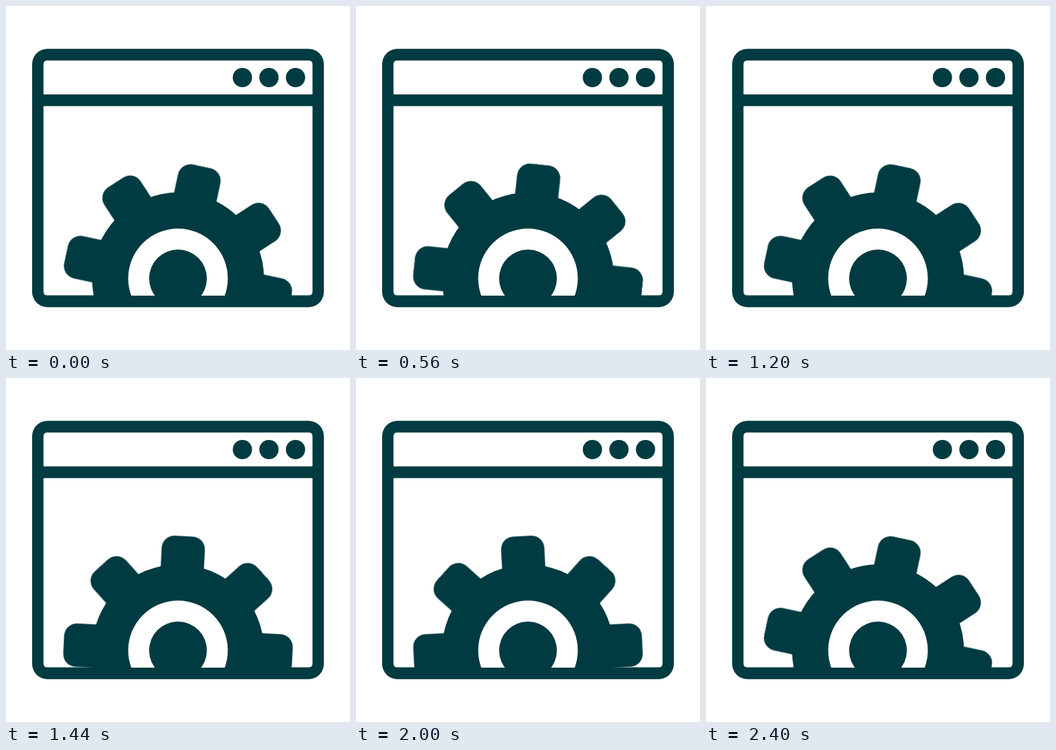
An HTML page for the animation above (2.48 s loop, 500 px wide and 500 px high).

```html
<!DOCTYPE html>
<html lang="en">
<head>
<meta charset="utf-8">
<title>Browser window with turning gear</title>
<style>
  html, body { margin: 0; width: 100%; height: 100%; overflow: hidden; background: #fff; }
  svg { display: block; width: 100%; height: 100%; fill: #003b41; }
  .pane { fill: #fff; }
  /* 12 degrees per 80 ms tick; the last tick matches the first pose */
  .teeth { animation: turn 2480ms steps(31, end) infinite; }
  @keyframes turn {
    from { transform: rotate(12deg); }
    to { transform: rotate(384deg); }
  }
</style>
</head>
<body>
<svg viewBox="0 0 500 500">
  <defs>
    <clipPath id="view"><rect x="54.5" y="145.5" width="391" height="275"/></clipPath>
    <rect id="bar" x="-31.5" y="-166.4" width="63" height="332.8" rx="18.5"/>
  </defs>

  <rect x="38" y="62.3" width="424" height="375.4" rx="22"/>
  <path class="pane" d="M60 79.3H440q5.5 0 5.5 5.5V127.500q0 1-1 1H55.500q-1 0-1-1V84.800q0-5.500 5.500-5.500z"/>
  <path class="pane" d="M55.500 145.500H444.500q1 0 1 1V415q0 5.500-5.500 5.500H60q-5.500 0-5.500-5.500V146.500q0-1 1-1z"/>
  <circle cx="343.6" cy="104" r="14"/>
  <circle cx="382.2" cy="104" r="14"/>
  <circle cx="420.8" cy="104" r="14"/>

  <g clip-path="url(#view)">
    <g transform="translate(250 396)">
      <g class="teeth">
        <use href="#bar"/>
        <use href="#bar" transform="rotate(45)"/>
        <use href="#bar" transform="rotate(90)"/>
        <use href="#bar" transform="rotate(135)"/>
      </g>
      <circle r="125"/>
      <circle class="pane" r="72.4"/>
      <circle r="42"/>
    </g>
  </g>
</svg>
</body>
</html>
```
